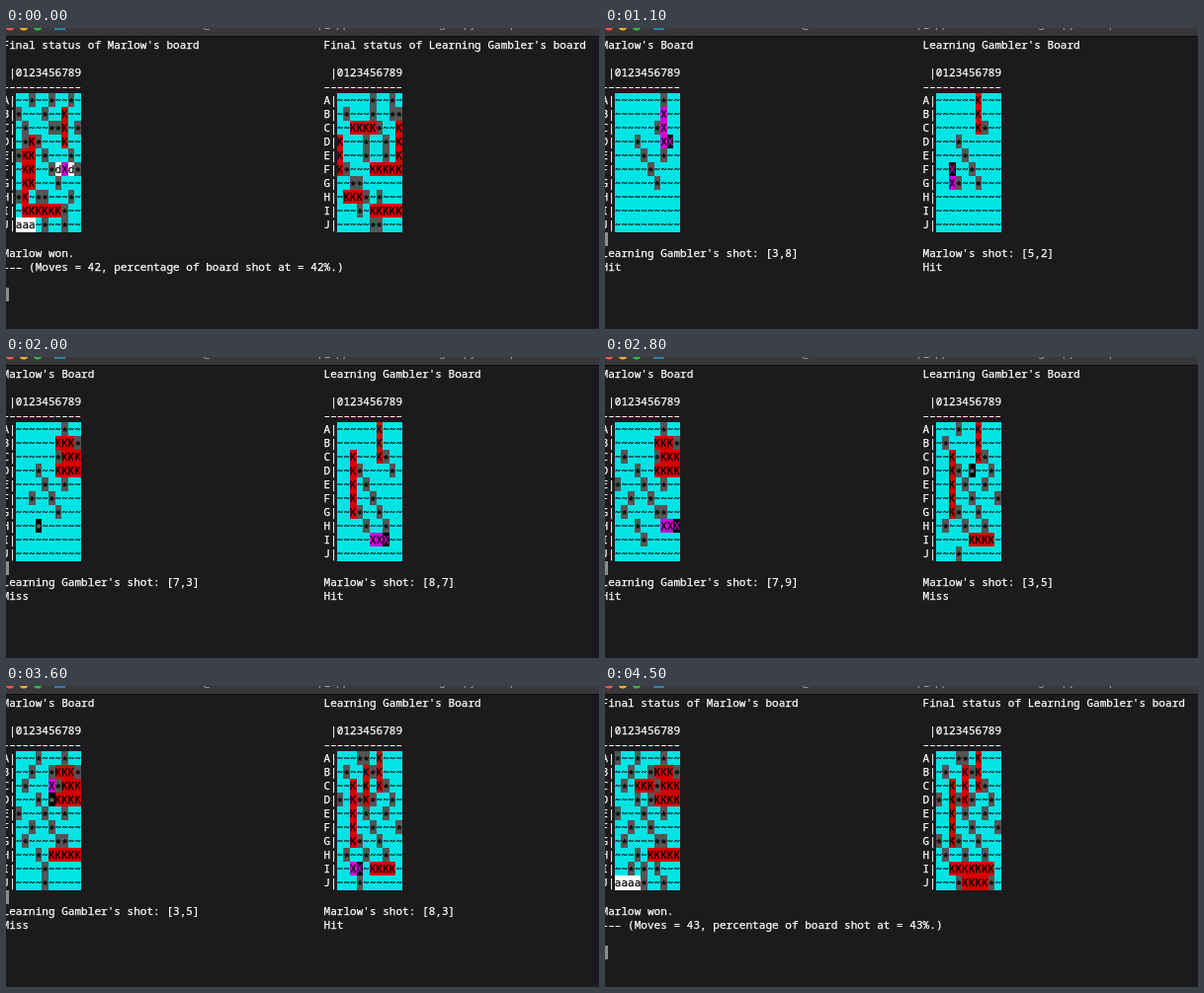
An HTML page with a canvas for the animation above (4600 ms loop, 600 by 305 pixels).

```html
<!DOCTYPE html>
<html lang="en">
<head>
<meta charset="utf-8">
<title>Battleship in a terminal</title>
<style>
html, body { margin: 0; width: 100%; height: 100%; overflow: hidden; background: #1c1a1c; }
canvas { display: block; width: 600px; height: 305px; }
</style>
</head>
<body>
<canvas id="stage" width="600" height="305"></canvas>
<script>
const ctx = document.getElementById('stage').getContext('2d');
const LOOP = 4600, STEP = 100;
const CHAR_W = 6.635, LINE_H = 14.05, TOP = 9.8;
const COLUMNS = [-3.5, 321.5];
const BOARD_ROW = 4, CURSOR_ROW = 14, TEXT_ROW = 15;
const LETTERS = 'ABCDEFGHIJ';
const FILL = { '~': '#00e4e4', '*': '#555555', K: '#d60000', X: '#d000d8', a: '#ffffff', d: '#ffffff' };
const NAMES = ['Marlow', 'Learning Gambler'];

// Each side: the shots fired at it in order, and where its ships lie.
const words = s => s.split(' ');
const sides = [
  {
    shots: words('D3 E4 F5 G6 C6 D7 C7 B7 A7 E7 D8 D9 D6 C8 C9 B8 B9 B6 F2 H3 ' +
      'C1 E0 I4 G1 H7 G7 H8 H9 H6 H5 J4 A3 B2 C5 B5 D5 C4 C3 A0 I2 J7 I6'),
    ships: ['D6 D7 D8 D9', 'C7 C8 C9', 'B6 B7 B8', 'H5 H6 H7 H8 H9', 'C3 C4 C5', 'J0 J1 J2 J3'].map(words)
  },
  {
    shots: words('D3 E4 F5 G6 C6 C7 B6 A6 G2 G3 F2 E2 D2 C2 D8 H4 H7 I5 I6 I7 ' +
      'I8 A3 B1 J3 H1 F9 E7 D5 B4 A4 B5 C4 D4 D0 I2 I3 I4 G0 J7 J8 J6 J5 J4'),
    ships: ['A6 B6 C6', 'C2 D2 E2 F2 G2', 'I5 I6 I7 I8', 'B4 C4 D4', 'I2 I3 I4', 'J4 J5 J6 J7'].map(words)
  }
];

const lastGame = [
  words('~~*~~*~~*~ *~~~*~~K~~ ~*~~~**K~* ~*K*~~~K~~ *KK~*~~~*~ ' +
    '~KK~~*dXd* ~KK~~~*~~~ *K~**~~~*~ ~KKKKKK*~~ aaa~*~~*~~'),
  words('~~~~~*~~*~ ~*~~~*~~** ~~KKKK*~~K K~~~*~~*~K K~~~*~~*~K ' +
    'K*~~~KKKKK ~~**~~~~~~ ~KKK*~*~~~ ~~~*~KKKKK ~~~~~**~~~')
];

const shipAt = (side, cell) => side.ships.find(ship => ship.includes(cell));

function makeGrid(side, move, reveal) {
  const fired = side.shots.slice(0, move);
  return [...LETTERS].map(letter => Array.from({ length: 10 }, (_, col) => {
    const cell = letter + col, ship = shipAt(side, cell);
    if (!fired.includes(cell)) return reveal && ship ? 'a' : '~';
    if (!ship) return '*';
    return ship.every(c => fired.includes(c)) ? 'K' : 'X';
  }));
}

// A thin outline gives the type its medium weight.
function print(text, x, row, color = '#ffffff') {
  ctx.fillStyle = ctx.strokeStyle = color;
  const y = Math.round(TOP + row * LINE_H) + 11;
  [...text].forEach((ch, i) => {
    if (ch === ' ') return;
    const cx = x + i * CHAR_W, cy = ch === '*' ? y + 2 : y;
    ctx.fillText(ch, cx, cy);
    ctx.strokeText(ch, cx, cy);
  });
}

// Edges fall on whole pixels so that neighbouring cells leave no seams.
function block(x, row, cols, color) {
  const left = Math.round(x), top = Math.round(TOP + row * LINE_H);
  const right = Math.round(x + cols * CHAR_W), bottom = Math.round(TOP + (row + 1) * LINE_H);
  ctx.fillStyle = color;
  ctx.fillRect(left, top, right - left, bottom - top);
}

function drawBoard(grid, x, title, current) {
  print(title, x, 0);
  print(' |0123456789', x, 2);
  print('–'.repeat(12), x, 3);
  const left = x + 2 * CHAR_W;
  grid.forEach((line, r) => {
    const row = BOARD_ROW + r;
    print(LETTERS[r] + '|', x, row);
    block(left, row, 10, FILL['~']);
    [...line].forEach((ch, c) => {
      const cx = left + c * CHAR_W;
      const isCurrent = current === LETTERS[r] + c;
      if (isCurrent) block(cx, row, 1, '#000000');
      else if (ch !== '~') block(cx, row, 1, FILL[ch]);
      const ink = !isCurrent ? '#000000' : ch === '*' ? '#808080' : FILL[ch];
      print(ch, cx, row, ink);
    });
  });
}

function drawWindow() {
  ctx.fillStyle = '#1c1a1c';
  ctx.fillRect(0, 0, 600, 305);
  ctx.fillStyle = '#39373a';
  ctx.fillRect(0, 0, 600, 8);
  ctx.fillStyle = '#0c0b0c';
  ctx.fillRect(0, 8, 600, 1);
  [['#f4574e', 4], ['#f2b32f', 18], ['#35b944', 32]].forEach(([color, x]) => {
    ctx.fillStyle = color;
    ctx.beginPath();
    ctx.arc(x, -2, 4.6, 0, 7);
    ctx.fill();
  });
  ctx.fillStyle = '#2f80a8';
  ctx.fillRect(49, 0, 11, 2);
  // Only the descenders of the title show.
  ctx.font = '11px Inter, sans-serif';
  ctx.fillStyle = '#a9a7aa';
  [['@', 198], ['p_app', 316], ['g', 438], ['py', 463], ['p', 510]].forEach(([s, x]) => ctx.fillText(s, x, 0));
}

function drawFinal(grids, moves) {
  grids.forEach((grid, i) => drawBoard(grid, COLUMNS[i], `Final status of ${NAMES[i]}'s board`));
  print(`${NAMES[0]} won.`, COLUMNS[0], TEXT_ROW);
  print(`––– (Moves = ${moves}, percentage of board shot at = ${moves}%.)`, COLUMNS[0], TEXT_ROW + 1);
  block(COLUMNS[0], CURSOR_ROW + 4, 1, '#8e8d8e');
}

function drawMove(move) {
  sides.forEach((side, i) => {
    const x = COLUMNS[i];
    const cell = side.shots[Math.min(move, side.shots.length) - 1];
    drawBoard(makeGrid(side, move), x, `${NAMES[i]}'s Board`, cell);
    print(`${NAMES[1 - i]}'s shot: [${LETTERS.indexOf(cell[0])},${cell[1]}]`, x, TEXT_ROW);
    print(shipAt(side, cell) ? 'Hit' : 'Miss', x, TEXT_ROW + 1);
  });
  block(COLUMNS[0], CURSOR_ROW, 1, '#8e8d8e');
}

function draw(step) {
  drawWindow();
  ctx.font = '500 11px "Noto Sans Mono", "DejaVu Sans Mono", monospace';
  ctx.lineWidth = 0.25;
  if (step === 0) drawFinal(lastGame, 42);
  else if (step > 43) drawFinal(sides.map((side, i) => makeGrid(side, 43, i === 0)), 43);
  else drawMove(Math.min(step + 1, Math.max(step, 8)));
}

const start = performance.now();
let shown = -1;
function tick() {
  const step = Math.floor(((performance.now() - start) % LOOP) / STEP);
  if (step !== shown) draw(shown = step);
  requestAnimationFrame(tick);
}
tick();
</script>
</body>
</html>
```
